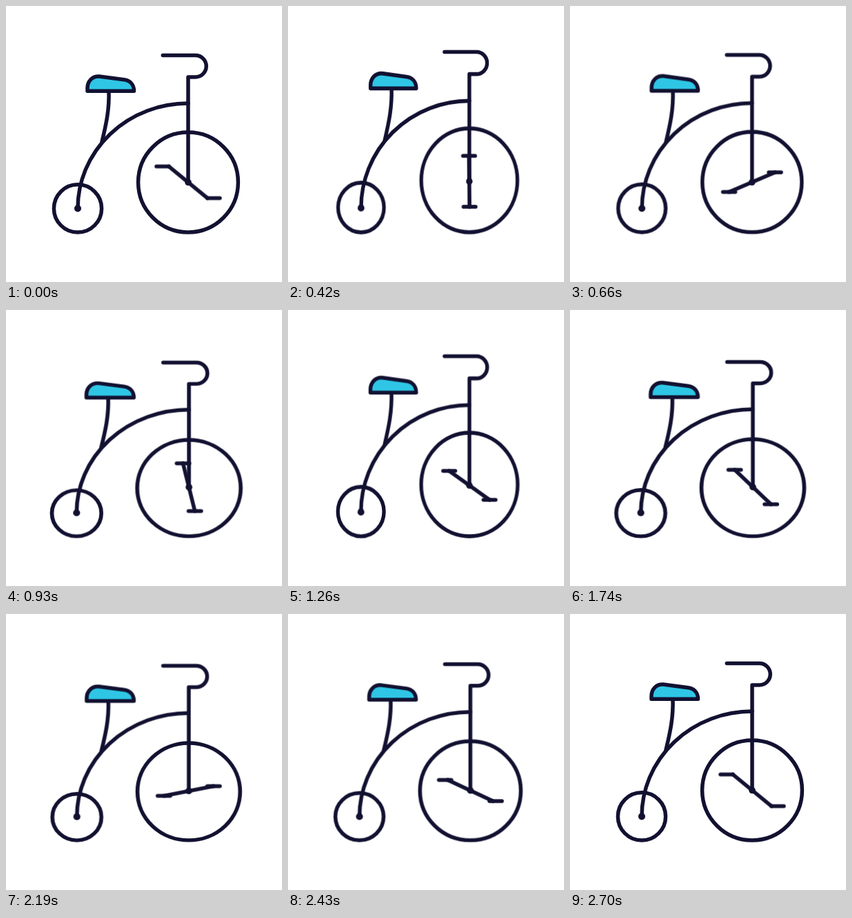
An HTML page without scripts for the animation above (2730 ms loop, 400x400 px).

```html
<!DOCTYPE html>
<html lang="en">
<head>
<meta charset="utf-8">
<title>Bicycle</title>
<style>
  html, body { margin: 0; width: 100%; height: 100%; overflow: hidden; background: #fff; }
  svg { display: block; width: 100%; height: 100%; }

  .line { fill: none; stroke: #121131; stroke-width: 5.5; stroke-linecap: round; stroke-linejoin: round; }
  .seat { fill: #2fc6e6; }
  .hub { fill: #121131; stroke: none; }

  /* The whole bike squashes on the ground line; the wheels squash once more. */
  .bounce { animation: bounce 2730ms cubic-bezier(.37, 0, .63, 1) infinite; }
  .bike { transform-origin: 200px 328px; }
  .rear { transform-origin: 104px 328px; }
  .front { transform-origin: 264px 328px; }
  @keyframes bounce {
    0%, 98.9%, 100% { transform: scale(1); }
    17.95%, 49.1% { transform: scale(.98, 1.02); }
    31.5%, 68.5% { transform: scale(1.02, .98); }
  }

  .crank, .level { animation: turn 2730ms cubic-bezier(.333, 0, .59, 1) infinite; }
  .crank { --start: 39.4deg; --end: 759.4deg; }
  .level { --start: -39.4deg; --end: -759.4deg; }
  @keyframes turn {
    0% { transform: rotate(var(--start)); }
    98.9%, 100% { transform: rotate(var(--end)); }
  }

  /* Pedals rest outside the crank ends and centre on them while turning. */
  .pedal { animation: slide 2730ms ease-in-out infinite; }
  .left { --rest: -9px; }
  .right { --rest: 9px; }
  @keyframes slide {
    0%, 98.9%, 100% { transform: translateX(var(--rest)); }
    14%, 81% { transform: translateX(0); }
  }
</style>
</head>
<body>
<svg viewBox="0 0 400 400">
  <g class="line bike bounce">
    <circle class="rear bounce" cx="104" cy="293.4" r="34.6"/>
    <circle class="front bounce" cx="264" cy="255.5" r="72.4"/>

    <path d="M149 123C150 150 145 172 139 197"/>
    <path d="M104 293.4A160 152.4 0 0 1 264 141"/>
    <path d="M227.3 71.5H274.5a15.75 15.75 0 0 1 0 31.5H264V255.5"/>
    <path class="seat" d="M118 123.3V119C118 109 125 101.5 135 102L171 106.8C180 108 185.5 114 185.5 123.3Z"/>

    <g transform="translate(264 255.5)">
      <g class="crank">
        <path d="M-36.2 0H36.2"/>
        <g transform="translate(-36.2 0)"><g class="level"><path class="pedal left" d="M-9 0H9"/></g></g>
        <g transform="translate(36.2 0)"><g class="level"><path class="pedal right" d="M-9 0H9"/></g></g>
      </g>
    </g>

    <circle class="hub" cx="104" cy="293.4" r="5"/>
    <circle class="hub" cx="264" cy="255.5" r="4.8"/>
  </g>
</svg>
</body>
</html>
```
